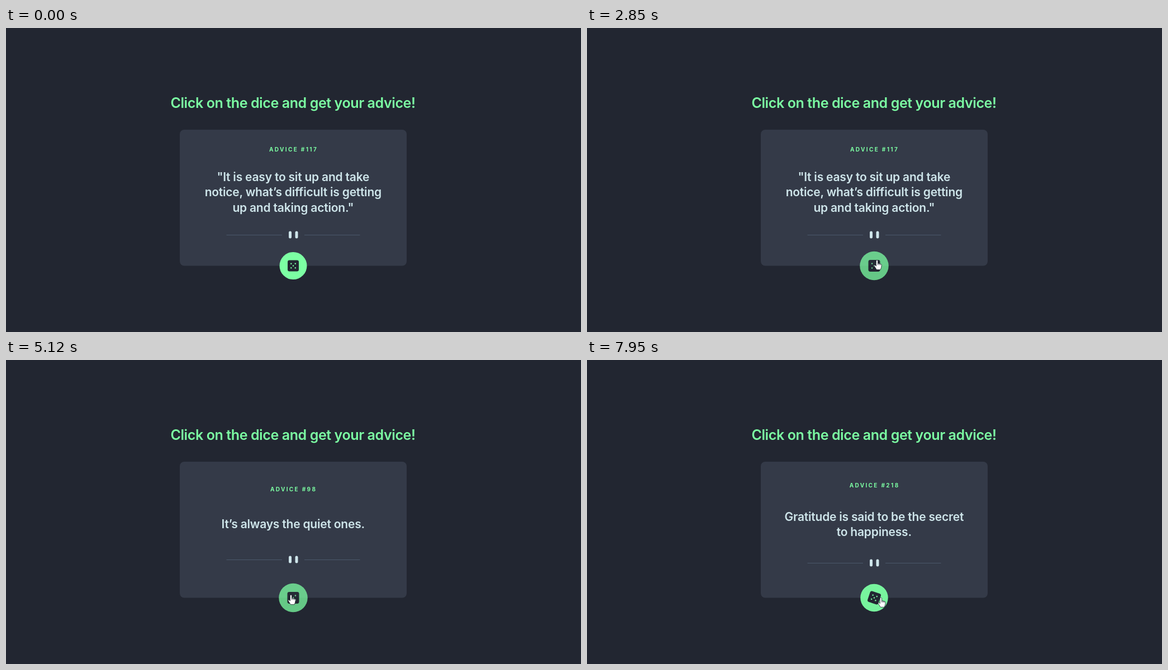
Animation of 1029 by 544 pixels, one loop 8 s. Source, as an HTML page:

```html
<!DOCTYPE html>
<html lang="en">
<head>
<meta charset="utf-8">
<title>Advice generator</title>
<style>
  html, body { margin: 0; width: 100%; height: 100%; overflow: hidden; background: #222631; }
  svg { display: block; width: 100%; height: 100%; }
  text { font-family: Inter, "Open Sans", sans-serif; font-weight: 600; text-anchor: middle; }
  .title { font-size: 25px; letter-spacing: -.016em; fill: #7cffa3; }
  .label { font-size: 10px; letter-spacing: 2.35px; font-weight: 700; fill: #7cffa3; }
  .quote { font-size: 21px; letter-spacing: -.01em; fill: #cee5ea; }
  .cursor { fill: #fff; stroke: #20242e; stroke-width: .8; stroke-linejoin: round; }
</style>
</head>
<body>
<svg viewBox="0 0 1029 544">
  <rect width="1029" height="544" fill="#222631"/>
  <text class="title" x="513.5" y="143">Click on the dice and get your advice!</text>
  <rect x="311" y="182" width="406" height="243.5" rx="8" fill="#343a48"/>
  <text class="label" id="label" x="514.6"/>
  <g id="quote"></g>
  <g id="divider">
    <path d="M394.5 .5H494M534 .5H633.5" stroke="#4a586b"/>
    <path d="M508.5 -4V4M520 -4V4" stroke="#cee5ea" stroke-width="5" stroke-linecap="round"/>
  </g>
  <g id="button">
    <circle r="24.5" fill="#7cffa3"/>
    <g id="dice">
      <rect x="-10" y="-10" width="20" height="20" rx="3.3" fill="#222631"/>
      <path d="M-3.75-3.75h0M3.75-3.75h0M0 0h0M-3.75 3.75h0M3.75 3.75h0"
            stroke="#7cffa3" stroke-width="2.5" stroke-linecap="round"/>
    </g>
  </g>
  <g id="pointer">
    <circle id="press" r="9.5" fill="#ff0" fill-opacity=".47"/>
    <path id="arrow" class="cursor" d="M0 0V13.6L3.1 10.8 5.3 15.8 7.5 14.8 5.3 10H9.4Z"/>
    <g id="hand" class="cursor">
      <path d="M-1.6 1.4Q0 -.9 1.5 1.4V6L6.5 7.2Q8.3 7.8 8.2 9.5L7.6 13.5 6.2 17.6H-.6L-4.8 11Q-5.4 8.8 -3.5 9.2L-1.6 11Z"/>
      <path d="M1.5 6V9M3.8 6.7V9.3M6 7.3V9.6"/>
    </g>
  </g>
</svg>
<script>
const $ = id => document.getElementById(id);
const LOOP = 8000, HOVER_MS = 300, LINE_HEIGHT = 27.6;

const advices = [
  { from: 0, id: 117, lines: ['"It is easy to sit up and take', 'notice, what’s difficult is getting', 'up and taking action."'] },
  { from: 3560, id: 98, lines: ['It’s always the quiet ones.'] },
  { from: 5780, id: 218, lines: ['Gratitude is said to be the secret', 'to happiness.'] }
];

// The cursor glides from rest to rest; a higher power slows it more at the end
const entry = { x: 957, y: 543 };
const moves = [
  { start: 640, end: 1410, x: 645, y: 429, power: 1.05 },
  { start: 1440, end: 2240, x: 528, y: 431, power: 2.5 },
  { start: 2260, end: 2580, x: 519, y: 415, power: 1.5 },
  { start: 3560, end: 4000, x: 561, y: 423, power: 1.5 },
  { start: 4470, end: 5120, x: 510, y: 420, power: 1.15 },
  { start: 6110, end: 6600, x: 569, y: 422, power: 1.3 },
  { start: 7390, end: 8030, x: 514, y: 425, power: .73 }
];
const hovers = [{ start: 1930, end: 3720 }, { start: 4739, end: 6300 }, { start: 7863, end: 9000 }];
const presses = [{ start: 2720, end: 2850 }, { start: 5450, end: 5580 }];

const clamp = k => Math.min(1, Math.max(0, k));
const mix = (a, b, k) => a + (b - a) * k;
const smooth = k => clamp(k) ** 2 * (3 - 2 * clamp(k));
const easeOut = (k, power) => 1 - (1 - k) ** power;
const within = (spans, t) => spans.some(span => t >= span.start && t < span.end);

function cursorAt(t) {
  let { x, y } = entry;
  for (const move of moves) {
    const k = clamp((t - move.start) / (move.end - move.start));
    x = mix(x, move.x, easeOut(k, move.power));
    y = mix(y, move.y, easeOut(k, move.power * 1.5));
  }
  return [x, y];
}

function hoverAt(t) {
  return Math.max(...hovers.map(({ start, end }) =>
    smooth((t - start) / HOVER_MS) * (1 - smooth((t - end) / HOVER_MS))));
}

let shown;
function showAdvice(advice) {
  if (advice === shown) return;
  shown = advice;
  const half = (advice.lines.length - 1) / 2;
  $('label').textContent = `ADVICE #${advice.id}`;
  $('label').setAttribute('y', 234.5 - half * 14);
  $('quote').innerHTML = advice.lines.map((line, i) =>
    `<text class="quote" x="513.8" y="${301.3 + (i - half) * LINE_HEIGHT}">${line}</text>`).join('');
  $('divider').setAttribute('transform', `translate(0 ${Math.round(356.7 + half * 13.4)})`);
}

function draw(t) {
  showAdvice(advices.filter(advice => t >= advice.from).pop());

  const hover = hoverAt(t);
  $('button').setAttribute('transform', `translate(514 425.5) scale(${1 + .05 * hover})`);
  $('button').setAttribute('opacity', 1 - .25 * hover);
  $('dice').setAttribute('transform', `rotate(${90 * hover})`);

  const over = within(hovers, t);
  const show = (id, visible) => $(id).setAttribute('display', visible ? 'inline' : 'none');
  show('pointer', t >= moves[0].start);
  show('hand', over);
  show('arrow', !over);
  show('press', within(presses, t));
  $('pointer').setAttribute('transform', `translate(${cursorAt(t)})`);
}

const start = performance.now();
function tick() {
  draw((performance.now() - start) % LOOP);
  requestAnimationFrame(tick);
}
draw(0);
requestAnimationFrame(tick);
</script>
</body>
</html>
```
